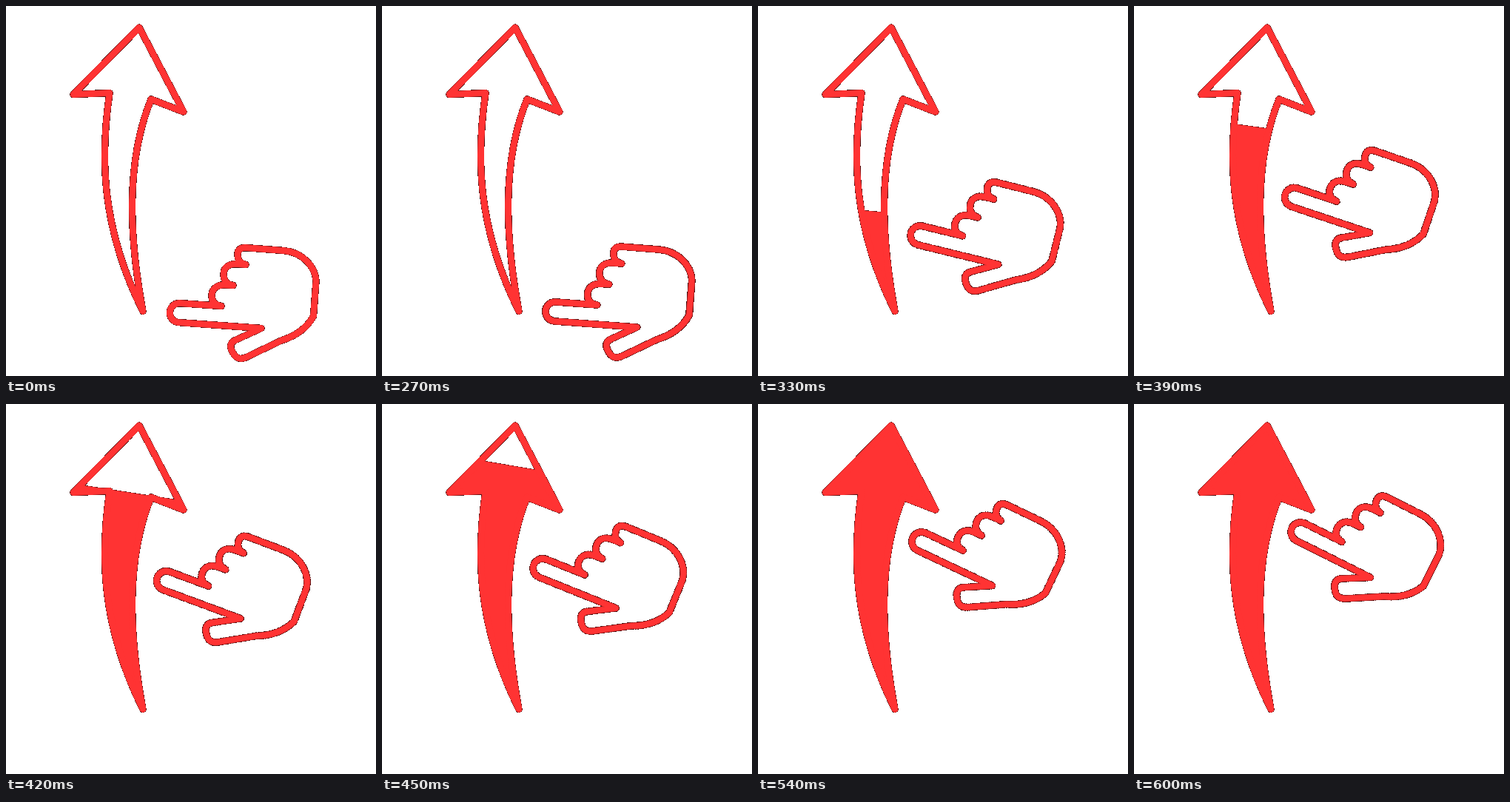
Animation of 500x500 px, one loop 1350 ms. Source, as an HTML page:

```html
<!DOCTYPE html>
<html lang="en">
<head>
<meta charset="utf-8">
<title>Swipe up</title>
<style>
  html, body { margin: 0; width: 100%; height: 100%; overflow: hidden; background: #fff; }
  svg { display: block; width: 100vw; height: 100vh; }
  .line { fill: none; stroke: #f33; stroke-width: 9; stroke-linecap: round; stroke-linejoin: round; }
</style>
</head>
<body>
<svg viewBox="0 0 500 500">
  <defs>
    <!-- hard edge with a thin dark rim -->
    <filter id="rim" filterUnits="userSpaceOnUse" x="0" y="0" width="500" height="500" color-interpolation-filters="sRGB">
      <feComponentTransfer in="SourceAlpha" result="hard">
        <feFuncA type="discrete" tableValues="0 1 1 1 1"/>
      </feComponentTransfer>
      <feComposite in="SourceGraphic" in2="hard" operator="atop"/>
    </filter>
    <path id="arrow" d="M180 29 L91 119.5 L140 117.5 C127 205 129 300 185 412.5 C166 310 162 210 196 126 L240 143 Z"/>
    <clipPath id="level">
      <rect id="cut" x="-300" y="0" width="1000" height="600"/>
    </clipPath>
  </defs>
  <g filter="url(#rim)">
    <g clip-path="url(#level)"><use href="#arrow" fill="#f33"/></g>
    <use href="#arrow" class="line"/>
    <!-- the fingertip centre is at 232,414 -->
    <path id="hand" class="line" d="
      M291 405 L233.9 401.1 A13 13 0 0 0 232.1 426.9 L345 435
      L310 451 C303 454 302 460 306 467 C310 475 315 478 324 474.5
      L372 451.5 C393 445 407 434 415.5 418.5 L419 371 C418 351 400 332 375 330
      L323 326 C317 326 313 329 313 335 C313 342 315 347 324 349
      L311 348 C300 348 294 354 294 362 C294 371 299 376 307 377
      L295 376.5 C284 376 278 383 278 391 C278 400 283 404 291 405 Z"/>
  </g>
</svg>
<script>
const LOOP = 1350, START = 270, STEP = 30, LAST = 11;
const hand = document.getElementById('hand');
const cut = document.getElementById('cut');

const mix = (a, b, p) => a + (b - a) * p;

function bezier(a, b, c, d, s) {
  const r = 1 - s;
  return r * r * r * a + 3 * r * r * s * b + 3 * r * s * s * c + s * s * s * d;
}

// curve parameter at which the time coordinate reaches u
function solve(u) {
  let lo = 0, hi = 1;
  for (let i = 0; i < 30; i++) {
    const mid = (lo + hi) / 2;
    if (bezier(0, 0.05, 0.5, 1, mid) < u) lo = mid; else hi = mid;
  }
  return hi;
}

// share of the swipe done; it moves in steps, the first one barely off rest
function share(t) {
  if (t < START) return 0;
  const step = Math.floor((t - START) / STEP) + 0.01;
  return Math.min(1, step / LAST);
}

function draw(t) {
  const u = share(t);
  const s = u ? solve(u) : 0;
  const p = bezier(0, 0.4, 0.9, 1, s);
  const x = bezier(232, 210.5, 210, 223, s);
  const y = mix(414.5, 172, p);
  hand.setAttribute('transform', `translate(${x} ${y}) rotate(${22.4 * p}) translate(-232 -414)`);
  cut.setAttribute('transform', `translate(165 ${mix(512, -28, p)}) rotate(${12 * p}) translate(-165 0)`);
}

const begin = performance.now();
function tick() {
  draw((performance.now() - begin) % LOOP);
  requestAnimationFrame(tick);
}
tick();
</script>
</body>
</html>
```
